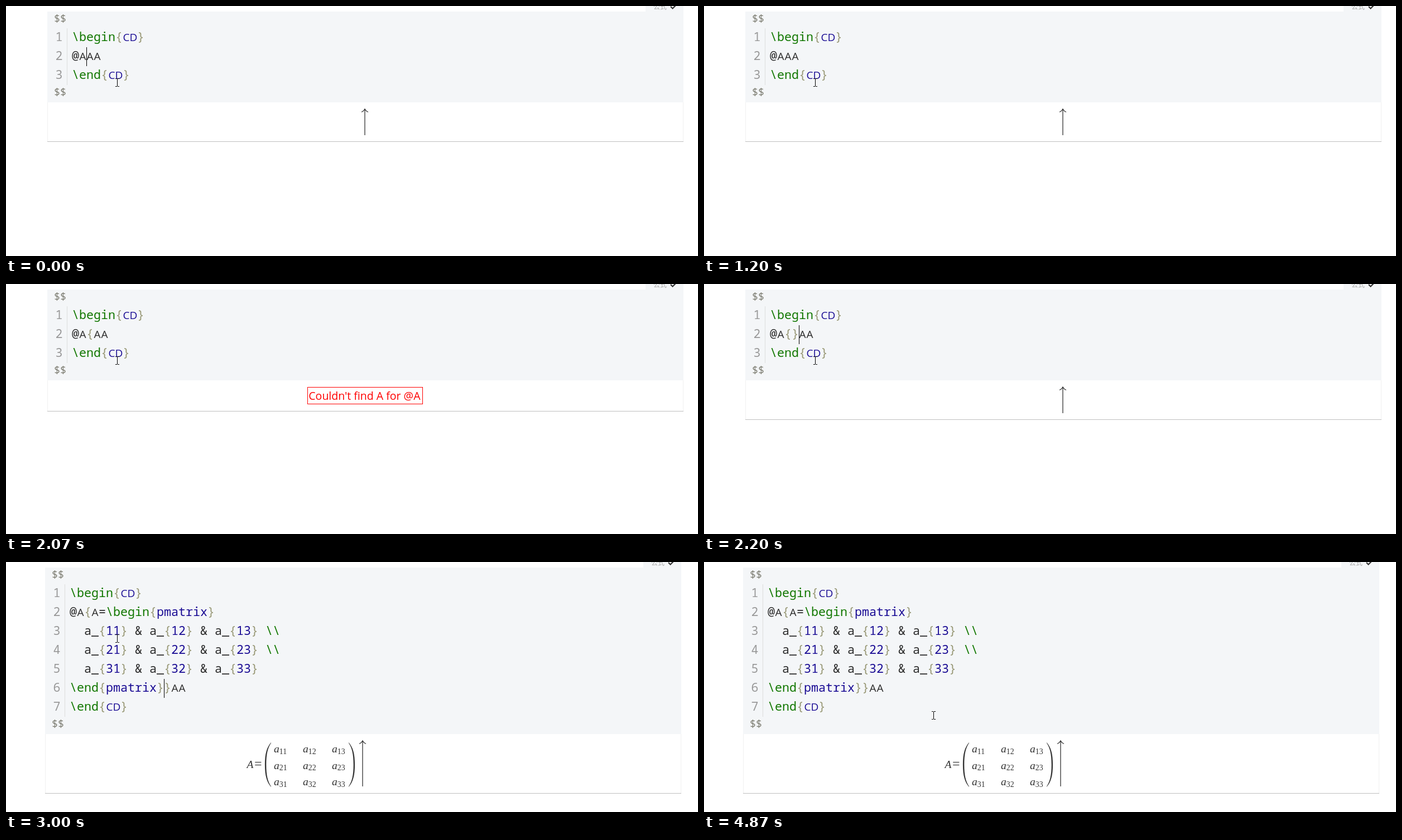
Recreate the animation shown at these times as an HTML page. Size 1240 by 449 pixels, loop 5.41 s.

```html
<!DOCTYPE html>
<html lang="en">
<head>
<meta charset="utf-8">
<title>Commutative diagram editor</title>
<style>
  html, body { margin: 0; width: 100%; height: 100%; overflow: hidden; background: #fff; }
  svg { display: block; width: 1240px; height: 449px; }
  rect { shape-rendering: crispEdges; }
  text { white-space: pre; }
  .code { font: 21.667px "Noto Sans Mono", monospace; fill: #2b2b2b; text-anchor: middle; }
  .code .cap { font: 19px "Open Sans", sans-serif; }
  .tag { fill: #170; }
  .bracket { fill: #997; }
  .atom { fill: #1a0c94; }
  .number { fill: #999; }
  .fence { font: 18.4px "Noto Sans Mono", monospace; fill: #7d7d72; }
  .tab { font: 12px "Noto Sans CJK SC", "Noto Sans CJK", sans-serif; fill: #aaa; }
  .error { font: 19.5px "Open Sans", sans-serif; fill: #f00; }
  .math { font: 19.5px "Liberation Serif", serif; fill: #333; }
  .math .var { font-style: italic; }
  .math .sub { font-size: 13.8px; }
  .math .equals { font-size: 24px; }
</style>
</head>
<body>
<svg id="stage" viewBox="0 0 1240 449"></svg>
<script>
const LOOP = 5410, CELL = 13, ROW = 34, CODE_X = 118, CODE_Y = 40;

const diagram = body => ['\\begin{CD}', ...body, '\\end{CD}'];
const entries = i => [1, 2, 3].map(j => `a_{${i}${j}}`).join(' & ');

const scenes = {
  plain:  { lines: diagram(['@AAA']), height: 70, panel: top => arrow(top, 47) },
  open:   { lines: diagram(['@A{AA']), height: 55, panel: error },
  closed: { lines: diagram(['@A{}AA']), height: 70, panel: top => arrow(top, 47) },
  matrix: {
    lines: diagram(['@A{A=\\begin{pmatrix}', `  ${entries(1)} \\\\`, `  ${entries(2)} \\\\`,
      `  ${entries(3)}`, '\\end{pmatrix}}AA']),
    height: 106, shift: -4, panel: top => matrix() + arrow(top, 82)
  }
};

// start ms, scene, caret [row, column] or null, pointer position
const rest = [199, 137], end = [411, 275];
const timeline = [
  [0, 'plain', [2, 2], rest],
  [200, 'plain', null, rest],
  [730, 'plain', [2, 2], rest],
  [1200, 'plain', null, rest],
  [1530, 'open', [2, 3], rest],
  [2070, 'open', null, rest],
  [2200, 'closed', [2, 4], rest],
  [2600, 'closed', [2, 3], rest],
  [3000, 'matrix', [6, 13], rest],
  [3530, 'matrix', null, rest],
  [4070, 'matrix', [6, 13], [270, 186]],
  [4130, 'matrix', [6, 13], [353, 238]],
  [4200, 'matrix', [6, 13], end],
  [4330, 'matrix', [7, 8], end],
  [4870, 'matrix', null, end]
];

const rect = (x, y, w, h, fill) => `<rect x="${x}" y="${y}" width="${w}" height="${h}" fill="${fill}"/>`;
const text = (x, y, cls, str) => `<text x="${x}" y="${y}" class="${cls}">${str}</text>`;
const tspan = (x, y, cls, str) => `<tspan x="${x}" y="${y}" class="${cls}">${str}</tspan>`;

function tokenClass(token) {
  if (/^\\/.test(token)) return 'tag';
  if (/^[{}]$/.test(token)) return 'bracket';
  return /^(CD|pmatrix|\d+)$/.test(token) ? 'atom' : '';
}

function codeLine(line, index) {
  const y = CODE_Y + 23 + index * ROW;
  const tokens = line.split(/(\\[a-z]+|\\\\|[{}]|(?<=\{)(?:CD|pmatrix|\d+)(?=\}))/);
  let column = 0, out = tspan(95, y, 'number', index + 1);
  for (const token of tokens) {
    const cls = tokenClass(token);
    for (const char of token) {
      const x = CODE_X + (column++ + 0.5) * CELL;
      const cap = /[A-Z]/.test(char) ? ' cap' : '';
      if (char !== ' ') out += tspan(x, y, cls + cap, char === '&' ? '&amp;' : char);
    }
  }
  return `<text class="code">${out}</text>`;
}

function arrow(top, length) {
  const y = top + 12;
  return `<path d="M643 ${y}v${length}M637 ${y + 5.5}Q641 ${y + 4} 643 ${y}Q645 ${y + 4} 649 ${y + 5.5}"
    fill="none" stroke="#333" stroke-width="1.3"/>`;
}

function error(top) {
  return `<rect x="540.5" y="${top + 12.5}" width="206" height="30" fill="none" stroke="#f00"/>` +
    text(542.3, top + 35, 'error', "Couldn't find A for @A");
}

function matrix() {
  let out = tspan(435.5, 369.5, 'var', 'A') + tspan(449, 370, 'equals', '=');
  for (let i = 0; i < 3; i++) {
    for (let j = 0; j < 3; j++) {
      const x = 484 + 52 * j, y = 342 + 29.5 * i;
      out += tspan(x, y, 'var', 'a') + tspan(x + 9.8, y + 2.5, 'sub', `${i + 1}${j + 1}`);
    }
  }
  const paren = `<path fill="#333" d="M479 324C471 333 467.9 345 467.9 364S471 395 479 404
    V403C473 394 470.3 383 470.3 364S473 334 479 325Z"/>`;
  return `<text class="math">${out}</text>${paren}<g transform="matrix(-1 0 0 1 1097 0)">${paren}</g>`;
}

function pointer([x, y]) {
  const serifs = [-7, 7].map(dy => rect(x - 3, y + dy, 3, 1, '#000') + rect(x + 1, y + dy, 3, 1, '#000'));
  return rect(x, y - 6, 1, 13, '#000') + serifs.join('');
}

function render([, name, caret, mouse]) {
  const { lines, height, shift = 0, panel } = scenes[name];
  const bottom = CODE_Y + lines.length * ROW, top = bottom + 31, paper = '#f4f6f8';
  return `<g transform="translate(${shift})">` +
    rect(1146, 0, 68, 10, paper) + text(1160, 6, 'tab', '公式') +
    '<path d="M1191 1l3.5 3.5L1201-2" fill="none" stroke="#333" stroke-width="2.2"/>' +
    rect(74, 10, 1140, top - 10, paper) +
    rect(74, top, 1, height, '#f0f0f0') + rect(1213, top, 1, height, '#f0f0f0') +
    rect(74, top + height, 1140, 1, '#bfbfbf') +
    rect(109, CODE_Y, 1, bottom - CODE_Y, '#ddd') +
    text(86, 29, 'fence', '$$') + text(86, bottom + 19, 'fence', '$$') +
    lines.map(codeLine).join('') + panel(top) +
    (caret ? rect(CODE_X + caret[1] * CELL, CODE_Y + (caret[0] - 1) * ROW, 1, ROW, '#000') : '') +
    '</g>' + pointer(mouse);
}

const stage = document.getElementById('stage');
let shown;
function tick() {
  const time = performance.now() % LOOP;
  const state = timeline.findLast(([start]) => start <= time);
  if (state !== shown) stage.innerHTML = render(shown = state);
  requestAnimationFrame(tick);
}
tick();
</script>
</body>
</html>
```
